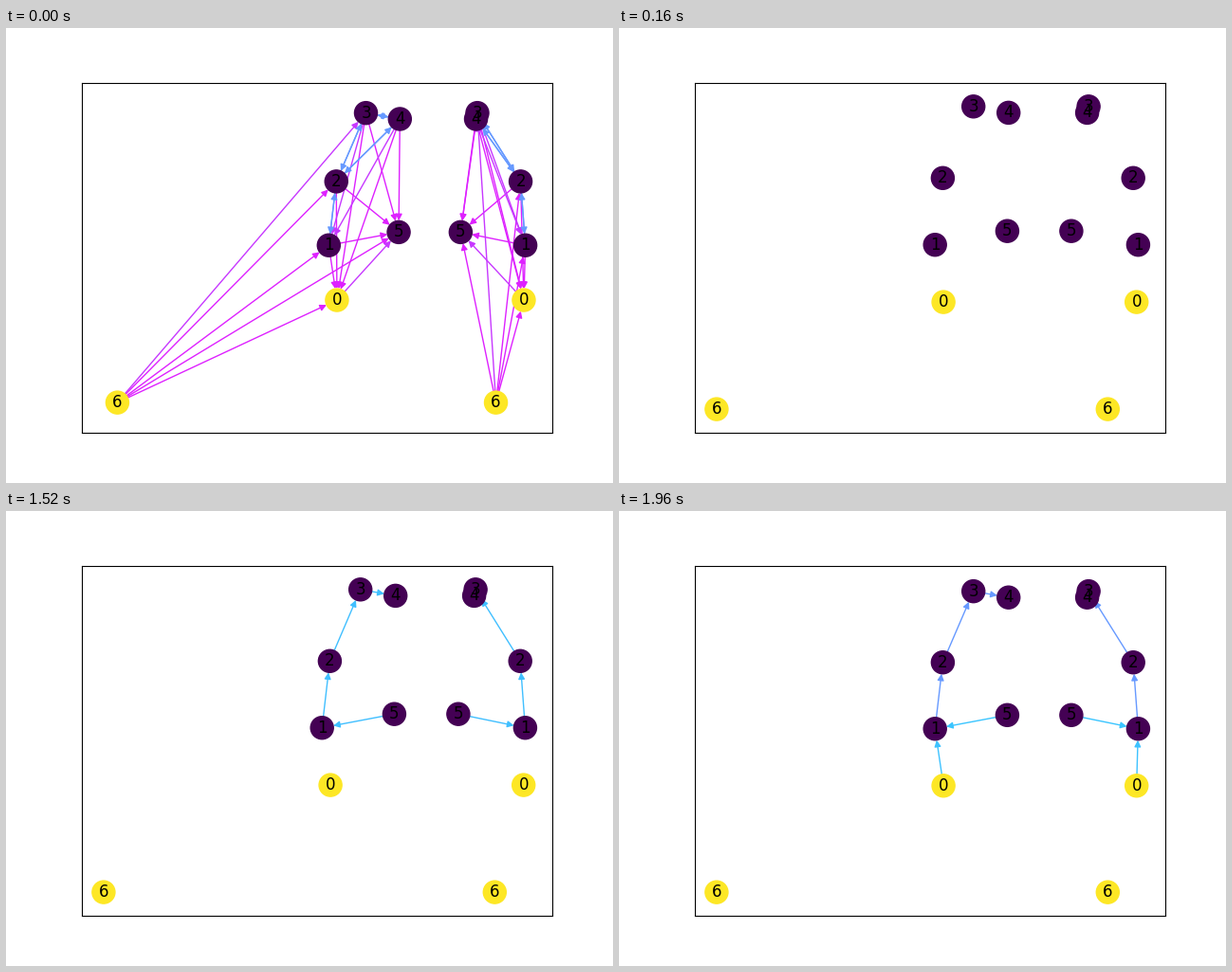
These frames come from a looping animation (640x480 px, 2.04 s). A matplotlib script:

```python
import numpy as np
import matplotlib.pyplot as plt
from matplotlib.animation import FuncAnimation
from matplotlib.patches import FancyArrowPatch

FRAMES, INTERVAL = 51, 40
GROW_START, ROOT_START, HOLD = 24, 40, 49
NODE_SIZE = 300
PAD = 0.05

# Nodes 0..6: both skeletons share their heights
HEIGHTS = [289.1, 228.7, 158.3, 82.8, 89.4, 214.2, 402.1]
COLUMNS = [[342.1, 333.2, 341.4, 373.7, 410.7, 409.4, 102.9],
           [545.7, 547.4, 542.2, 495.1, 493.6, 476.9, 515.3]]
SKELETONS = [np.column_stack([xs, HEIGHTS]) for xs in COLUMNS]
NODE_COLORS = plt.cm.viridis([1.0, 0, 0, 0, 0, 0, 1.0])

# Smallest view without its margin: left, top and right, bottom
VIEW_MIN, VIEW_MAX = np.array([102.55, 74.4]), np.array([553.45, 410.4])

# Fading links by kind: weight at start, loss per frame, source-target pairs
FADING = [
    (.87, .25, "10 20 25 30 35 40 45 60 61 65"),
    (.87, .36, "15 62"),
    (.78, .40, "05 31 41 63"),
    (.40, .24, "12 21 23 32 24 42 34 43"),
]


def links(n):
    """Visible links and their weights."""
    if n < GROW_START:
        return {(int(a), int(b)): start - loss * n
                for start, loss, pairs in FADING if start >= loss * n
                for a, b in pairs.split()}
    n = min(n, HOLD)
    chain = min(.4, (n - GROW_START) / 56)
    out = {(1, 2): chain}
    if n > GROW_START:
        out[2, 3] = out[3, 4] = chain
        out[5, 1] = chain - .085 * max(0, n - HOLD + 2)
    if n >= ROOT_START:
        out[0, 1] = min(.24, (n - ROOT_START) / 28)
    return out


def fit_view(edges):
    """Widen the view so that the padded extent of all links fits in."""
    low, high = VIEW_MIN, VIEW_MAX
    used = sorted({node for edge in edges for node in edge})
    if used:
        for points in SKELETONS:
            first, last = points[used].min(axis=0), points[used].max(axis=0)
            pad = PAD * (last - first)
            low, high = np.minimum(low, first - pad), np.maximum(high, last + pad)
    margin = PAD * (high - low)
    (left, top), (right, bottom) = low - margin, high + margin
    ax.set(xlim=(left, right), ylim=(bottom, top))


fig, ax = plt.subplots(figsize=(6.4, 4.8), dpi=100)
ax.set_position([.125, .11, .775, .77])
ax.set(xticks=[], yticks=[])

for points in SKELETONS:
    ax.scatter(*points.T, s=NODE_SIZE, c=NODE_COLORS, zorder=2)
    for i, (x, y) in enumerate(points):
        ax.text(x, y, str(i), size=12, ha="center", va="center", zorder=3)
arrows = []


def update(n):
    while arrows:
        arrows.pop().remove()
    edges = links(n)
    fit_view(edges)
    gap = NODE_SIZE ** .5 / 2
    for points in SKELETONS:
        for (a, b), weight in edges.items():
            arrow = FancyArrowPatch(
                points[a], points[b], arrowstyle="-|>", mutation_scale=10,
                shrinkA=gap, shrinkB=gap, linewidth=1, zorder=1,
                color=plt.cm.cool(float(weight)))
            arrows.append(ax.add_patch(arrow))
    return arrows


anim = FuncAnimation(fig, update, frames=FRAMES, interval=INTERVAL,
                     repeat=True, repeat_delay=0, blit=False)
plt.show()
```
